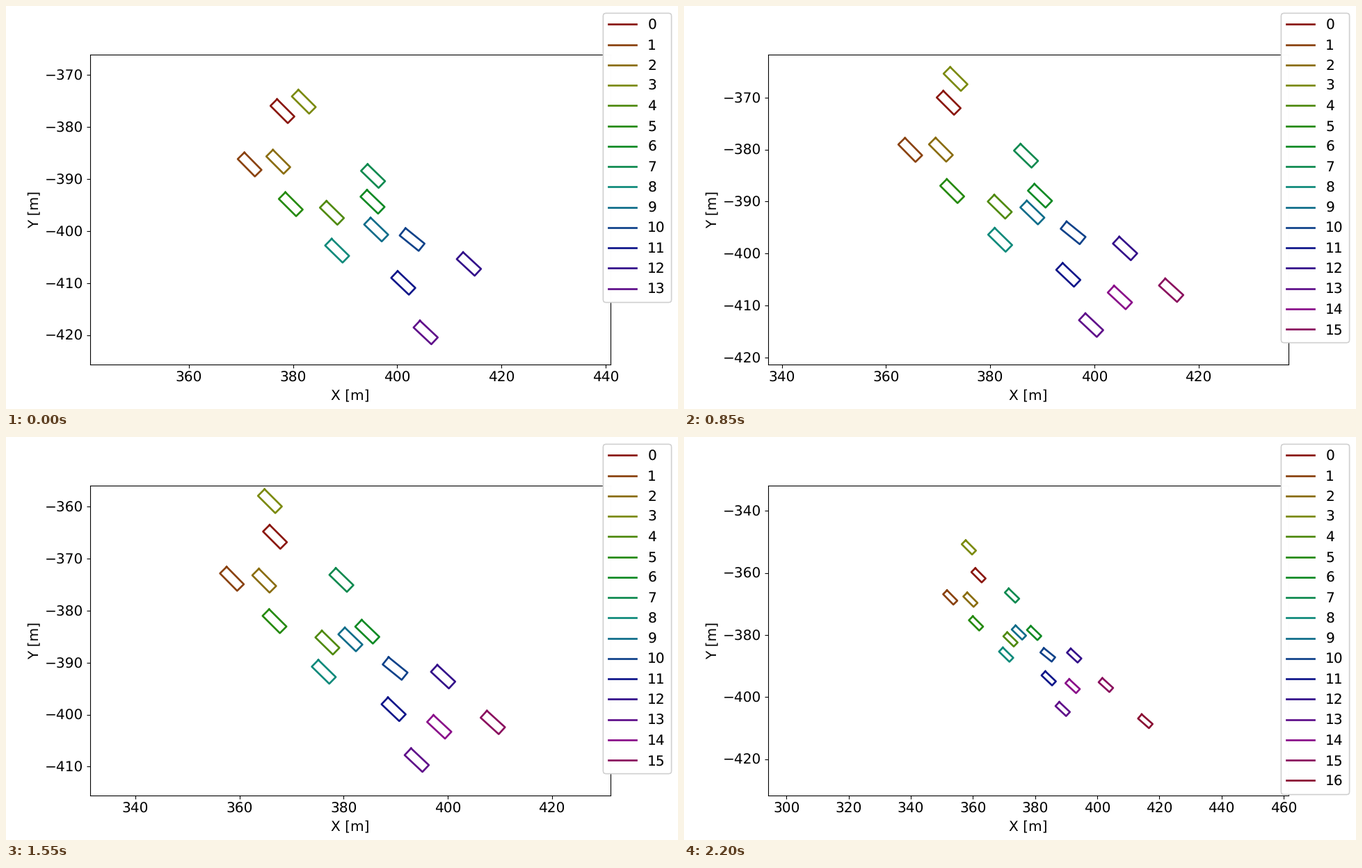
Write a matplotlib script that moves like this. It is 966 px wide and 580 px high and loops after 2250 ms.

```python
import matplotlib.pyplot as plt
import numpy as np
from colorsys import hls_to_rgb
from matplotlib.animation import FuncAnimation

FRAMES, INTERVAL = 45, 50
HALF_VIEW = 50
LENGTH, WIDTH = 4.7, 1.8
ACCEL = 0.33
ENTRY_LINE = 825.3

# position halfway through the loop, metres driven in x per half loop
X, Y, SPEED = np.array([
    (370.2, -369.2, 8.1), (362.5, -377.9, 9.5), (368.5, -378.0, 9.0),
    (370.7, -363.8, 11.7), (380.1, -389.3, 7.7), (370.6, -385.9, 9.3),
    (387.8, -387.2, 7.8), (384.3, -378.7, 11.4), (379.9, -395.4, 8.9),
    (385.7, -389.8, 10.6), (393.8, -394.3, 9.4), (393.1, -402.3, 8.4),
    (403.5, -396.8, 10.6), (397.5, -412.0, 8.3), (402.6, -406.3, 10.2),
    (412.6, -405.1, 9.5), (425.3, -416.5, 9.5),
]).T

# the road bends gently; one car drifts across to the next lane
SLOPE = 1.008 - 0.0021 * (X - 366)
SLOPE[10] -= 0.14
COLORS = [hls_to_rgb(0.01 + i / len(X), 0.3, 0.8) for i in range(len(X))]
BOX = np.array([(1, 1), (1, -1), (-1, -1), (-1, 1), (1, 1)]) * (LENGTH / 2, WIDTH / 2)

SCALE = 0.966
FONT = 15 * SCALE
plt.rcParams.update({
    "text.hinting": "none",
    "lines.linewidth": 2 * SCALE,
    "axes.labelsize": FONT,
    "xtick.labelsize": FONT,
    "ytick.labelsize": FONT,
    "legend.fontsize": FONT,
    "legend.labelspacing": 0.492,
})


def positions(frame):
    """Centres of the cars that have crossed the entry line."""
    t = 2 * frame / (FRAMES - 1) - 1
    gone = SPEED * t + ACCEL * t ** 2
    x, y = X - gone, Y + SLOPE * gone
    seen = x - y < ENTRY_LINE
    return x[seen], y[seen]


def outline(x, y, slope):
    a = np.arctan(slope)
    turn = np.array([(-np.cos(a), np.sin(a)), (np.sin(a), np.cos(a))])
    return (BOX @ turn + (x, y)).T


fig, ax = plt.subplots(figsize=(9.66, 5.8), dpi=100)


def update(frame):
    ax.clear()
    fig.legends.clear()
    xs, ys = positions(frame)

    lines = []
    for i, (x, y) in enumerate(zip(xs, ys)):
        lines += ax.plot(*outline(x, y, SLOPE[i]), color=COLORS[i], label=str(i))

    ax.set_aspect("equal", adjustable="datalim")
    ax.set_xlim(xs.mean() - HALF_VIEW, xs.mean() + HALF_VIEW)
    ax.set_ylim(ys.mean() - HALF_VIEW, ys.mean() + HALF_VIEW)
    ax.set_xlabel("X [m]")
    ax.set_ylabel("Y [m]")

    # translucent legends pile up, so the last few still shine through
    for past in (2, 1, 0):
        known = len(positions(max(frame - past, 0))[0])
        fig.legend(handles=lines[:known], loc="upper right")


anim = FuncAnimation(fig, update, frames=FRAMES, interval=INTERVAL,
                     init_func=lambda: None, repeat=True, repeat_delay=0)
plt.show()
```
